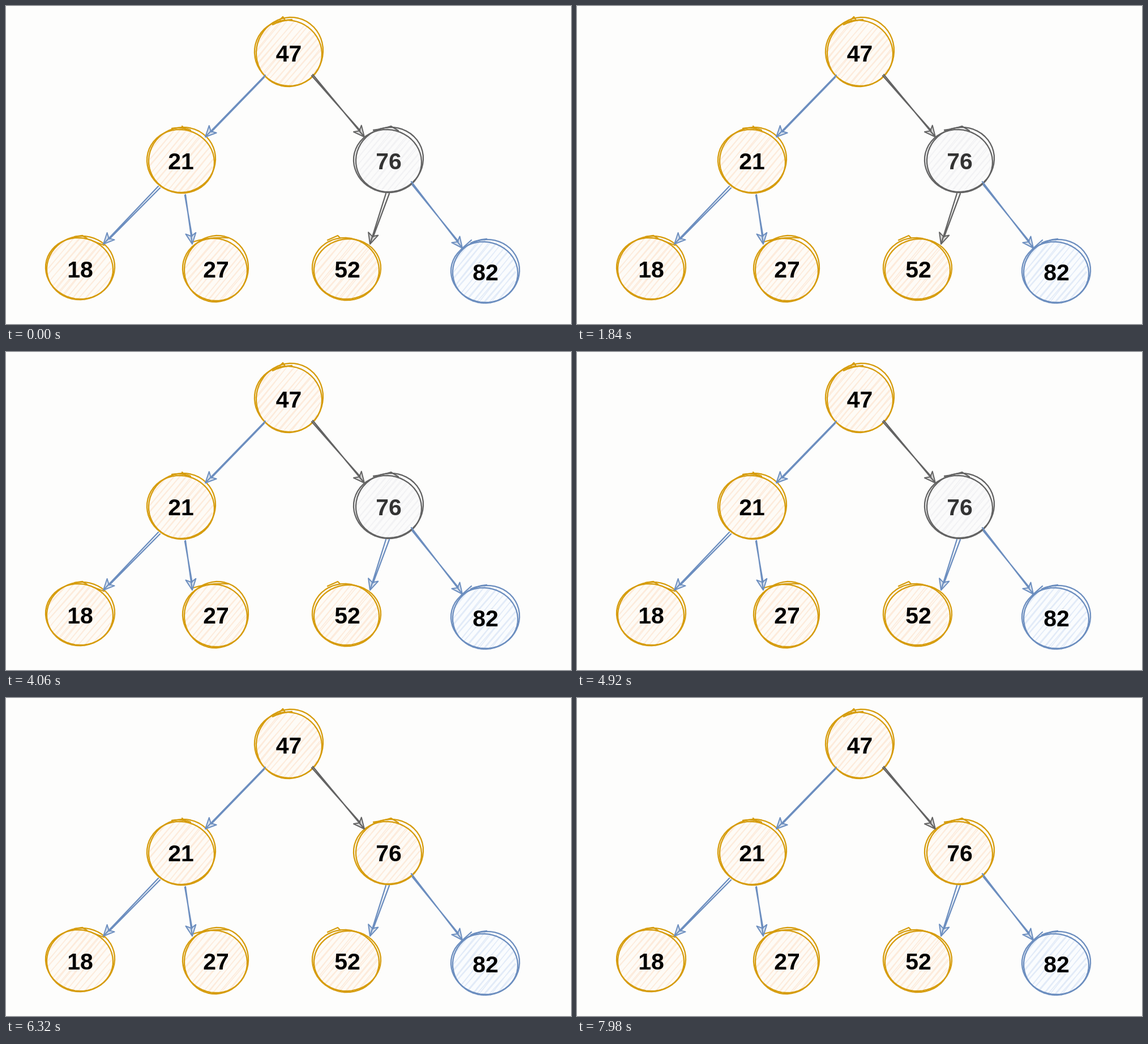
An HTML page for the animation above (8000 ms loop, 998x561 px).

```html
<!DOCTYPE html>
<html lang="en">
<head>
<meta charset="utf-8">
<title>Binary tree traversal</title>
<style>
  html, body { margin: 0; width: 100%; height: 100%; overflow: hidden; background: #fdfdfc; }
  svg { display: block; width: 100vw; height: 100vh; }
  text { font: bold 41px "Liberation Sans", Arial, sans-serif; text-anchor: middle; stroke: none; }
  path { fill: none; stroke-linecap: round; stroke-linejoin: round; }
</style>
</head>
<body>
<svg id="stage" viewBox="0 0 998 561"></svg>
<script>
const LOOP = 8000;
const EDGE_DONE = 3360, NODE_DONE = 5020;
const ORANGE = { line: '#d69c0c', hatch: '#fdebdb', base: '#fefbf6', text: '#000' };
const BLUE = { line: '#6c8ebf', hatch: '#e2ebf8', base: '#fafcfe', text: '#000' };
const GREY = { line: '#636363', hatch: '#f2f2f4', base: '#fbfbfb', text: '#333' };

const stage = document.getElementById('stage');

function add(parent, tag, attrs) {
  const el = document.createElementNS('http://www.w3.org/2000/svg', tag);
  for (const key in attrs) el.setAttribute(key, attrs[key]);
  return parent.appendChild(el);
}

function random(seed) {
  return () => (seed = (seed * 16807) % 2147483647) / 2147483647;
}

// Two crossing rings, given by their bounds: left, right, top, bottom.
const nodes = {
  47: { rings: [[438, 559, 24, 142], [441, 561, 19, 143]], label: [499.5, 98],
        spur: 'M471 33 Q487 25 505 24 M484 24 L489 19 L493 25' },
  21: { rings: [[248, 369, 217, 331], [251, 371, 213, 330]], label: [309, 288],
        spur: 'M293 216 Q310 213 326 219 M311 212 L317 218' },
  76: { rings: [[613, 735, 217, 330], [617, 738, 213, 329]], label: [676, 288],
        spur: 'M649 219 Q667 216 680 212 L693 220' },
  18: { rings: [[69, 190, 408, 518], [71, 193, 405, 519]], label: [131, 478.5],
        spur: 'M152 414 L173 422 M121 407 L135 405 L143 410' },
  27: { rings: [[311, 427, 409, 521], [314, 429, 404, 523]], label: [371, 478.5],
        spur: 'M327 417 Q358 407 393 409' },
  52: { rings: [[540, 660, 408, 520], [543, 663, 410, 518]], label: [603, 478.5],
        spur: 'M568 413 L586 405 L590 409' },
  82: { rings: [[785, 905, 415, 524], [788, 908, 411, 525]], label: [847, 483.5],
        spur: 'M804 429 L822 413 M821 418 Q835 412 849 411' }
};

const toPath = points => 'M' + points.map(p => p.map(v => v.toFixed(1)).join(' ')).join('L');

// An ellipse pulled out along one diagonal, as in a quick pen stroke.
function ringPath({ cx, cy, rx, ry }, lean) {
  const points = Array.from({ length: 48 }, (_, i) => {
    const a = i / 48 * 2 * Math.PI, r = 1 + lean * Math.sin(2 * a);
    return [cx + rx * r * Math.cos(a), cy + ry * r * Math.sin(a)];
  });
  return toPath(points) + 'Z';
}

function hatchPath({ cx, cy, rx, ry }, seed) {
  const rnd = random(seed * 7919);
  const jitter = () => (rnd() - .5) * 4;
  const angle = -50 * Math.PI / 180;
  const ux = Math.cos(angle), uy = Math.sin(angle);
  const r = (rx + ry) / 2 - 1;
  let d = '';
  for (let off = 4 - r; off < r; off += 8.5) {
    const half = Math.sqrt(r * r - off * off);
    for (let pass = 0; pass < 2; pass++) {
      const a = off + jitter(), b = off + jitter();
      d += toPath([[cx - uy * a - ux * half, cy + ux * a - uy * half],
                   [cx - uy * b + ux * half, cy + ux * b + uy * half]]);
    }
  }
  return d;
}

function drawNode(value, style) {
  const { rings, label, spur } = nodes[value];
  const group = add(stage, 'g', { stroke: style.line, 'stroke-width': 2.3 });
  const ovals = rings.map(([l, r, t, b]) =>
    ({ cx: (l + r) / 2, cy: (t + b) / 2, rx: (r - l) / 2 - 1, ry: (b - t) / 2 - 1 }));
  add(group, 'ellipse', { ...ovals[0], fill: style.base, stroke: 'none' });
  add(group, 'path', { d: hatchPath(ovals[0], value), stroke: style.hatch, 'stroke-width': 1.6 });
  ovals.forEach((oval, i) => add(group, 'path', { d: ringPath(oval, i ? -.018 : .018) }));
  add(group, 'path', { d: spur });
  add(group, 'text', { x: label[0], y: label[1], fill: style.text }).textContent = value;
  return group;
}

// A doubled line whose second stroke starts at (x3, y3), with a notched head.
function drawArrow([x1, y1, x2, y2, x3, y3], style) {
  const length = Math.hypot(x2 - x1, y2 - y1);
  const ux = (x2 - x1) / length, uy = (y2 - y1) / length;
  const back = (along, side) => [x2 - ux * along - uy * side, y2 - uy * along + ux * side];
  const group = add(stage, 'g', { stroke: style.line, 'stroke-width': 2.3 });
  add(group, 'path', { d: toPath([[x1, y1], back(3, 0)]) + toPath([[x3, y3], back(14, -1.5)]) });
  add(group, 'path', {
    d: toPath([[x2, y2], back(19, 9), back(14, 0), back(19, -9)]) + 'Z',
    style: `fill:${style.line};fill-opacity:.25`, 'stroke-width': 2
  });
  return group;
}

function swapAt(before, after, time) {
  const offset = time / LOOP;
  const toggle = (el, from, to) => el.animate(
    [{ opacity: from, offset: 0 }, { opacity: from, offset },
     { opacity: to, offset }, { opacity: to, offset: 1 }],
    { duration: LOOP, iterations: Infinity });
  toggle(before, 1, 0);
  toggle(after, 0, 1);
}

drawNode(47, ORANGE);
drawNode(21, ORANGE);
swapAt(drawNode(76, GREY), drawNode(76, ORANGE), NODE_DONE);
[18, 27, 52].forEach(value => drawNode(value, ORANGE));
drawNode(82, BLUE);

drawArrow([458, 122, 352, 231, 456, 126], BLUE);
drawArrow([542, 121, 633, 231, 540, 123], GREY);
drawArrow([269, 318, 172, 420, 272, 321], BLUE);
drawArrow([317, 333, 329, 420, 316, 334], BLUE);
drawArrow([716, 310, 806, 427, 718, 316], BLUE);
const lastEdge = [671, 331, 643, 420, 677, 331];
swapAt(drawArrow(lastEdge, GREY), drawArrow(lastEdge, BLUE), EDGE_DONE);
</script>
</body>
</html>
```
